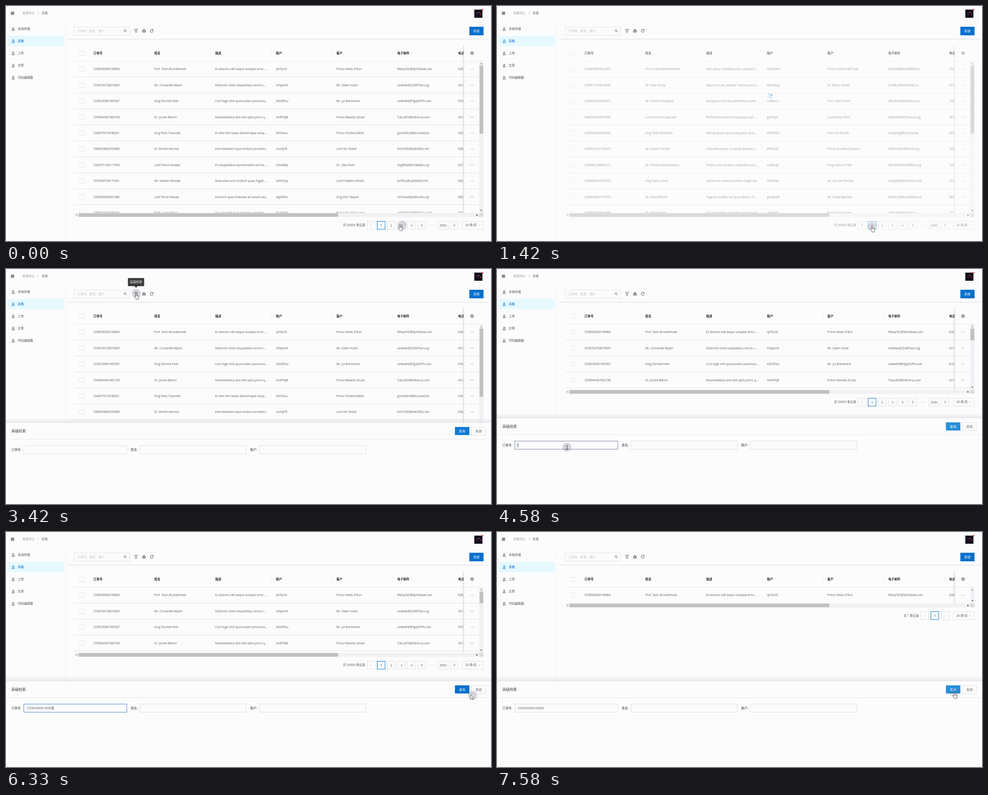
An HTML page that plays this animation: 1076 px wide and 521 px high, repeating every 8000 ms.

```html
<!DOCTYPE html>
<html lang="zh">
<head>
<meta charset="utf-8">
<title>表格</title>
<style>
html, body { margin: 0; width: 100%; height: 100%; overflow: hidden; background: #fcfcfd; }
svg { display: block; width: 100%; height: 100%; }
text { font-family: "Open Sans", "Noto Sans CJK SC", "Noto Sans CJK JP", "Noto Sans CJK", sans-serif; }
</style>
</head>
<body>
<svg id="stage" viewBox="0 0 1076 521"></svg>
<script>
const LOOP = 8000, FPS = 12;
const BG = '#fcfcfd', BLUE = [6, 112, 204], LIGHT = [38, 144, 220];
const INK = '#505050', SOFT = '#5c5c5c', LINE = '#e3e3e6', EDGE = '#dfe0e5';
const COLS = [194, 329, 464, 599, 733, 868, 1003];
const HEADS = ['订单号', '姓名', '描述', '账户', '客户', '电子邮件', '电话'];
const ROW = 35.4;

// order | name | description | account | customer | mail | phone
const parse = s => s.trim().split('\n').map(r => r.split('|'));
const FIRST = parse(`
3558936838196866|Prof. Tavin Brundelhoek|Ex dolores odit eaque voluptas error. ...|qhTsLVE|Prince Veldo D'Run|RMupTsO@KpVGkww.com|628-
3538704728873845|Mr. Corvandel Mipen|Distinctio modi voluptatibus rerum c...|bTqsemX|Mr. Dalen Voost|oodkfav@QUMTbzn.org|431-
3558239081983567|King Dorvital Pesh|Cum fugit nihil quod autem possimus...|KDOBTuv|Mr. Jul Brantmere|vzdkwKM@TgqVDPN.com|870-
3558944367463198|Dr. Jorvek Blannt|Necessitatibus sint velit optio porro q...|XmRTKJB|Prince Mavelto Drusk|TubLoEV@D4kmruz.com|431-
3548479318748261|King Pavic Tolundek|Et velit nihil saepe doloremque volup...|NKTobLu|Prince Tordina Welsk|goUeXKm@BzLUswd.biz|635-
3588354842955686|Dr. Brentil Harvost|Exercitationem ipsa incidunt providen...|nnzXpTE|Lord Vin Tasbel|EnVoTkD@duKZBGz.net|836-
3528751928117946|Lord Fenrol Draskel|Et voluptatibus reprehenderit sint hic ...|OvkdKBp|Dr. Ulba Fenk|DzgMVaK@zTsBwEk.org|627-
3578209738177461|Mr. Ostavin Belurak|Nulla alias eum incidunt quasi fugiat. ...|uKVhTpq|Lord Pradden Vimolt|kvTDLe@uaGMzKd.info|842-
3558095836301480|Lord Tervin Mosab|Dolorem quia molestias ab earum dol...|dzpKRVe|King Dorl Taspen|UbTzzoe@pDEkUnK.org|665-
3558033343785484|Prof. Lurbo Tenks|Qui voluptatum in dolorem sapiente...|TKvDDbE|Prince Brastell Vunop|vmBDpKO@RTOKUpe.info|572-`);
const THIRD = parse(`
3528878050613476|Prince Odel Marthovinsen|Quo natus molestiae alias voluptate i...|OKdTOKn|Prince Holmar McTrusk|TavNUDB@UkMdBGt.ru|552-
3588515146618299|Dr. Tovin Brusp|Sequi cum est pariatur maiores porro...|bRkOBdq|Dr. Benko Tavliet|DUKRuzt@vtUKRGD.ru|831-
3548493265696325|Mr. Fabrent Holdqvar|Quisquam dolorem perferendis amet ...|TUBevUz|Prof. Udell Torbin|qRKdDzL@kOvuNsU.biz|740-
3568703005997400|Lord Perrolvin Dasuntel|Perferendis dolores id quia qui eum. ...|gvTodpk|Lord Danvy Pime|OvBUKRN@TkzbouK.org|367-
3568563206495050|King Tolfe Ubendrick|Eveniet ipsum qui consequatur quas ...|KdPTBkD|Prof. Olvi Buntle|dOkpEng@KvoTzud.biz|837-
3568541307195237|Mr. Davelo Puntier|Odio laboriosam a impedit quaerat o...|BTKvzoR|Prince Ormatio Dulvasch|kvRbTzn@UDKkznb.org|745-
3528481288440121|Dr. Orvand Martholensen|Tenetur eius ut dolore doloribus volu...|zUBkvqd|King Vulmon Praik|dKUVDPz@KURTBNk.org|524-
3548982763794750|King Tolmu Vaner|Labore non deserunt omnis magni ea...|OdzKTdn|Mr. Dorvan Passilke|eUDqKBZ@OnKvdUk.info|531-
3548929687147559|Dr. Dasolf Brunk|Fuga est mollitia aut quos debitis. Et ...|gkUBGdK|Mr. Fulde Marnoss|DRkvTUE@KuNuBsB.com|865-
3528076333954598|Dr. Folne Tasker|Qui consectetur iste natus voluptatum...|vbkgdoD|Prof. Rolanto Besk|vkTBzKR@DKdRUK.ru|272-`);

// Pointer path: time, x, y
const PATH = [[-83, 879, 486], [0, 874, 485], [170, 877, 486], [870, 877, 486], [1080, 832, 488],
  [1620, 832, 488], [2000, 327, 72], [2083, 293, 50], [2250, 289, 54], [3550, 289, 54],
  [4000, 190, 388], [4083, 180, 393], [4330, 155, 395], [5450, 155, 395], [5900, 1010, 393],
  [6000, 1048, 391], [6083, 1052, 384], [6250, 1035, 362], [6333, 1031, 361], [6550, 1015, 356]];
const CLICKS = [80, 1330, 2930, 6920];
// Loading: start, data arrives
const LOADS = [[0, 490], [1250, 1650], [6835, 7240]];
const FIELDS = [[12, '订单号:', 39.5, 228.5], [277, '姓名:', 297.5, 235.5], [542, '账户:', 562.5, 236]];

const clamp = v => Math.max(0, Math.min(1, v));
const ramp = (t, a, d) => clamp((t - a) / d);
const mix = (a, b, k) => `rgb(${a.map((v, i) => Math.round(v + (b[i] - v) * k))})`;
const crisp = v => Math.floor(v) + 0.5;
const blue = mix(BLUE, BLUE, 0);

const rect = (x, y, w, h, fill, stroke = 'none', more = '') =>
  `<rect x="${x}" y="${y}" width="${w}" height="${h}" fill="${fill}" stroke="${stroke}" ${more}/>`;
const line = (x1, y1, x2, y2, color = LINE, w = 1) =>
  `<path d="M${x1} ${y1}L${x2} ${y2}" stroke="${color}" stroke-width="${w}"/>`;
const path = (d, stroke = '#333', w = 0.8, fill = 'none', more = '') =>
  `<path d="${d}" stroke="${stroke}" stroke-width="${w}" fill="${fill}" ${more}/>`;
const dot = (x, y, r, fill, more = '') => `<circle cx="${x}" cy="${y}" r="${r}" fill="${fill}" ${more}/>`;
const at = (x, y, body) => `<g transform="translate(${x} ${y})">${body}</g>`;
// Text is placed by its vertical centre
const text = (x, cy, s, size = 6.75, fill = INK, more = '') =>
  `<text x="${x}" y="${cy + size * 0.36}" font-size="${size}" fill="${fill}" ${more}>${s}</text>`;
const MID = 'text-anchor="middle"';

function pos(t) {
  let i = PATH.findIndex(k => k[0] > t);
  if (i < 0) return PATH[PATH.length - 1].slice(1);
  i = Math.max(i, 1);
  const [a, b] = [PATH[i - 1], PATH[i]], k = clamp((t - a[0]) / (b[0] - a[0]));
  return [1, 2].map(n => a[n] + (b[n] - a[n]) * k);
}

function shell() {
  let s = line(133.5, 32, 133.5, 521, '#f0f0f3') + line(138, 73.5, 1073, 73.5, '#dcdcdf');
  for (const [x, y] of [[11.5, 13], [15, 13], [11.5, 16.5], [15, 16.5]]) s += rect(x, y, 2.5, 2.5, 'none', '#444', 'stroke-width=".8"');
  s += text(36.5, 16, '实验中心', 6.75, '#8e8e8e') + text(70, 16, '/', 6.75, '#8e8e8e') + text(79, 16, '表格', 6.75, '#707070');
  s += rect(1039, 8, 18, 18, '#0b0b1a') + rect(1041, 15, 6, 1, '#354a80') + rect(1047, 13, 4, 3, '#7d2440')
    + rect(1044, 18, 3, 2, '#582042') + rect(1051, 17, 4, 2, '#8c2a3c') + dot(1057.3, 8, 1.8, '#ff3f50');
  s += rect(3, 66.5, 125.5, 22.5, '#e5f9ff');
  ['本地存储', '表格', '上传', '文章', '代码编辑器'].forEach((label, i) => {
    const y = 51 + 27 * i, c = i === 1 ? blue : INK;
    s += path(`M14 ${y - 3}h4M14.8 ${y - 3}v3l-1.8 3.3h6l-1.8-3.3v-3M14 ${y + 1}h4`, c, 0.8) + text(26, y, label, 6.75, c);
  });
  s += rect(151.5, 46.5, 123, 18, BG, '#e2e3e8') + text(158, 55.3, '订单号、姓名、账户', 6.75, '#bdbdc1');
  s += at(264.5, 55, '<circle cx="-.5" cy="-.5" r="2.2" fill="none" stroke="#555" stroke-width=".8"/>' + path('M1.2 1.2L3 3', '#555', 0.9));
  s += at(288.5, 55, path('M-3.4-3.2h6.8L1.2.2V3.3H-1.2V.2Z'));
  s += at(306, 55, path('M-3.2-.8h6.4v4h-6.4ZM-1-.8v-2.4h2v2.4M-3.2 1h6.4'));
  s += at(323.3, 55, path('M2.8-1.8A3.3 3.3 0 1 0 3.3.6M3.2-3.4v2h-2', '#333', 0.9));
  return s + rect(1028, 46, 31.5, 19, blue) + text(1043.7, 55.5, '新增', 6.75, '#fff', MID);
}

function table(rows, B, page, thumb) {
  let s = '';
  const box = y => rect(163.5, crisp(y - 4.5), 9, 9, '#fff', '#e2e3ea');
  s += box(104.5);
  HEADS.forEach((h, i) => {
    s += text(COLS[i], 104.5, h, 6.75, '#262626', 'font-weight="700"');
    if (i) s += line(crisp(COLS[i] - 10), 99, crisp(COLS[i] - 10), 110, '#ececf0');
  });
  s += line(152, 122.5, 1059, 122.5, '#e8e8ec');
  let body = '', tail = '';
  rows.forEach((r, i) => {
    const y = 140.2 + i * ROW, foot = crisp(157.7 + i * ROW);
    body += box(y) + r.map((v, c) => text(COLS[c], y, v, 6.35, SOFT)).join('');
    if (rows.length > 1) {
      body += line(152, foot, 1050, foot);
      tail += line(1016, foot, 1050, foot);
    }
    for (const d of [-2.4, 0, 2.4]) tail += dot(1034 + d, y, 0.55, '#444');
  });
  s += `<clipPath id="body"><rect x="151" y="123" width="900" height="${B - 123.5}"/></clipPath><g clip-path="url(#body)">${body}</g>`;

  // Pinned column
  s += rect(1010, 87, 6, B - 87, 'url(#side)') + rect(1016, 87, 43, 35, BG) + rect(1016, 123, 34, B - 123, BG);
  s += line(1015.5, 87, 1015.5, B, '#d0d0d4') + `<g clip-path="url(#body)">${tail}</g>`;
  s += at(1034, 104.5, '<circle r="2.9" fill="none" stroke="#444" stroke-width=".8"/><circle r="3.5" fill="none" stroke="#444" stroke-width="1" stroke-dasharray="1.8 1.865"/><circle r="1.2" fill="none" stroke="#444" stroke-width=".7"/>');

  // Scrollbars
  s += rect(1050, 123, 9, B - 123, '#f1f1f5') + path('M1052.2 129l2.3-2.8 2.3 2.8z', 'none', 0, '#8b8b8b')
    + path(`M1052.2 ${B - 7}l2.3 2.8 2.3-2.8z`, 'none', 0, '#555');
  if (thumb) s += rect(1050.5, 132, 8.5, thumb, '#c1c1c3');
  s += rect(152, B, 898, 8.7, '#f1f1f4') + rect(161, B + 0.3, 576, 8.2, '#c1c1c1') + rect(1050, B, 9.3, 8.7, '#dcdcdc')
    + path(`M157.8 ${B + 2.2}l-2.8 2.2 2.8 2.2z`, 'none', 0, '#999') + path(`M1043.8 ${B + 2.2}l2.8 2.2-2.8 2.2z`, 'none', 0, '#222');
  return s + pager(B + 27, rows.length === 1, page);
}

function pager(y, single, page) {
  const top = crisp(y - 9);
  const cell = (x, label, on, w = 18) => rect(crisp(x - w / 2), top, w - 0.5, 17.5, BG, on ? blue : EDGE)
    + text(x, y + 0.2, label, 6.5, on ? blue : INK, MID + (on ? ' font-weight="600"' : ''));
  const arrow = (x, d, off) => cell(x, '') + path(`M${x - d * 1.3} ${y - 2.8}l${d * 2.8} 2.8l${-d * 2.8} 2.8`, off ? '#c4c4c8' : '#444', 0.9);
  let s = text(single ? 936 : 797, y, `共 ${single ? 1 : 50000} 条记录`, 6.7, INK, 'text-anchor="end"');
  if (single) s += arrow(949.2, -1, true) + cell(971.7, 1, true);
  else {
    s += arrow(810, -1, page.first);
    for (let i = 1; i <= 5; i++) s += cell(809.8 + 22.5 * i, i, i === page.now);
    for (const d of [-3.8, 0, 3.8]) s += dot(945 + d, y, 0.7, '#bbb');
    s += cell(969.6, 2500, false, 22.5);
  }
  s += arrow(994.3, 1, single) + rect(1012.5, top, 46.5, 17.5, BG, EDGE) + text(1019, y, '20 条/页', 6.7);
  return s + path(`M1047.2 ${y - 1.2}l2.5 2.5 2.5-2.5`, '#aaa', 0.8);
}

function spinner(t, start, y, alpha) {
  let s = '';
  for (let i = 0; i < 4; i++) {
    const k = 0.65 + 0.35 * Math.cos(Math.PI * ((t - start) / 1000 + 0.4 * i));
    s += dot(i === 0 || i === 3 ? -2.8 : 2.8, i < 2 ? -2.8 : 2.8, 1.9, blue, `opacity="${k}"`);
  }
  return `<g transform="translate(605.3 ${y}) rotate(${60 + (t - start) * 0.3})" opacity="${alpha}">${s}</g>`;
}

function drawer(t) {
  const y = 331 + 190 * Math.exp(-(t - 3250) / 57);
  const light = ramp(t, 3330, 250) * (1 - ramp(t, 4583, 200)) + ramp(t, 6480, 170);
  const press = t > 6900 && t < 7080;
  const fill = press ? '#0560b4' : mix(BLUE, LIGHT, clamp(light));
  let s = rect(0, y - 11, 1076, 11, 'url(#rise)') + rect(0, y, 1076, 200, BG);
  s += text(12, y + 18.3, '高级检索', 8, '#333') + line(0, y + 36.5, 1076, y + 36.5, '#e9e9ed');
  s += rect(996, y + 9, 32, 18, fill) + text(1012, y + 18.2, '查询', 6.9, '#fff', MID);
  s += rect(1032.5, y + 9.5, 31.5, 17.5, BG, EDGE) + text(1048.2, y + 18.2, '关闭', 6.9, INK, MID);
  FIELDS.forEach(([lx, label, x, w], i) => {
    let border = '#dcdde3';
    if (i === 0 && t > 4160) border = t < 4580 ? '#a9c3dc' : t < 4660 ? '#74879b' : mix([63, 134, 207], [220, 221, 227], ramp(t, 6870, 250));
    s += text(lx, y + 59.3, label, 6.75, '#333') + rect(x, y + 50.5, w, 18, BG, border);
  });
  const typed = t >= 5245;
  if (typed) s += text(46, y + 59.5, FIRST[0][0], 6.35, SOFT);
  if (t > 4575 && t < 6900 && (t - (typed ? 5250 : 4580) + 2) % 1000 < 500) {
    const x = typed ? 104.4 : 46.5;
    s += line(x, y + 55, x, y + 64, '#222', 0.9);
  }
  return s;
}

function tooltip(t) {
  const a = ramp(t, 2400, 250) * (1 - ramp(t, 3640, 200));
  if (!a) return '';
  return `<g opacity="${a}">${rect(270.5, 20, 36, 18, '#3c3c3e', 'none', 'rx="1"')}${path('M285 38h7l-3.5 3.8z', 'none', 0, '#3c3c3e')}${text(288.5, 29, '高级检索', 6.75, '#fff', MID)}</g>`;
}

function pointer(t) {
  const [x, y] = pos(t), [cx, cy] = pos(t - 83);
  const inside = (a, b, c, d) => x >= a && x <= c && y >= b && y <= d;
  const open = t > 3500;
  const hand = open ? inside(996, 340, 1028, 358) : inside(801, 477, 1003, 495) || inside(283, 46, 300, 64);
  const beam = open && FIELDS.some(f => inside(f[2], 381, f[2] + f[3], 400));
  const pressed = CLICKS.some(c => t - c > 60 && t - c < 120);
  let icon;
  if (hand) icon = path('M-1.2.8C-1.2-.6 1-.6 1 .8V4.6L4.6 5.4C6 5.8 6.3 6.6 6.1 7.8L5.3 11V13H-.6V11.4L-3.8 7.6C-4.4 6.6-3.2 5.7-2.2 6.5L-1.2 7.4Z', '#333', 0.8, '#fff') + path('M1 4.8v2.4M2.8 5.3v2M4.5 5.7v1.8', '#555', 0.5);
  else if (beam) icon = at(0.3, 1, path('M-2-4.2h1.4L0-3.7.6-4.2H2M0-3.7V3.7M-2 4.2h1.4L0 3.7.6 4.2H2', '#222', 0.9));
  else icon = path('M0 0V10L2.4 7.9 4 11.3 5.6 10.6 4.1 7.3H7.2Z', '#444', 0.8, '#fff');
  return dot(cx, cy, pressed ? 8.5 : 10, '#50506a', `opacity="${t > 7300 ? 0.14 : 0.22}"`) + at(x, y, icon);
}

const DEFS = `<defs>
<linearGradient id="side"><stop stop-color="#000" stop-opacity="0"/><stop offset="1" stop-color="#000" stop-opacity=".05"/></linearGradient>
<linearGradient id="rise" x2="0" y2="1"><stop stop-color="#404060" stop-opacity="0"/><stop offset="1" stop-color="#404060" stop-opacity=".11"/></linearGradient>
</defs>`;
const SHELL = DEFS + rect(0, 0, 1076, 521, BG) + shell();
const stage = document.getElementById('stage');

function render(t) {
  const third = t > 490 && t < 1650, found = t > 7240, short = t > 3500;
  const rows = found ? FIRST.slice(0, 1) : third ? THIRD : FIRST;
  const B = found ? 158.3 : short ? 268 : 459;
  const page = { now: t > 70 && t < 1325 ? 3 : 1, first: t < 70 || t > 1500 };
  let veil = 0, spin = '';
  for (const [start, done] of LOADS) {
    const k = ramp(t, start, 200) * (1 - ramp(t, done, 300));
    if (!k) continue;
    veil = k;
    spin = spinner(t, start, found ? 127 : short ? 196 : 199.3, k * 0.7);
  }
  const thumb = found ? 0 : short ? 26 : 151;
  stage.innerHTML = SHELL + `<g opacity="${1 - 0.5 * veil}">${table(rows, B, page, thumb)}</g>` + spin
    + (t > 3325 ? drawer(t) : '') + tooltip(t) + pointer(t);
}

// The picture advances in fixed steps
let last = -1;
function loop(now) {
  const tick = Math.floor((now % LOOP + 7) * FPS / 1000) % (LOOP * FPS / 1000);
  if (tick !== last) render((last = tick) * 1000 / FPS);
  requestAnimationFrame(loop);
}
render(0);
requestAnimationFrame(loop);
</script>
</body>
</html>
```
